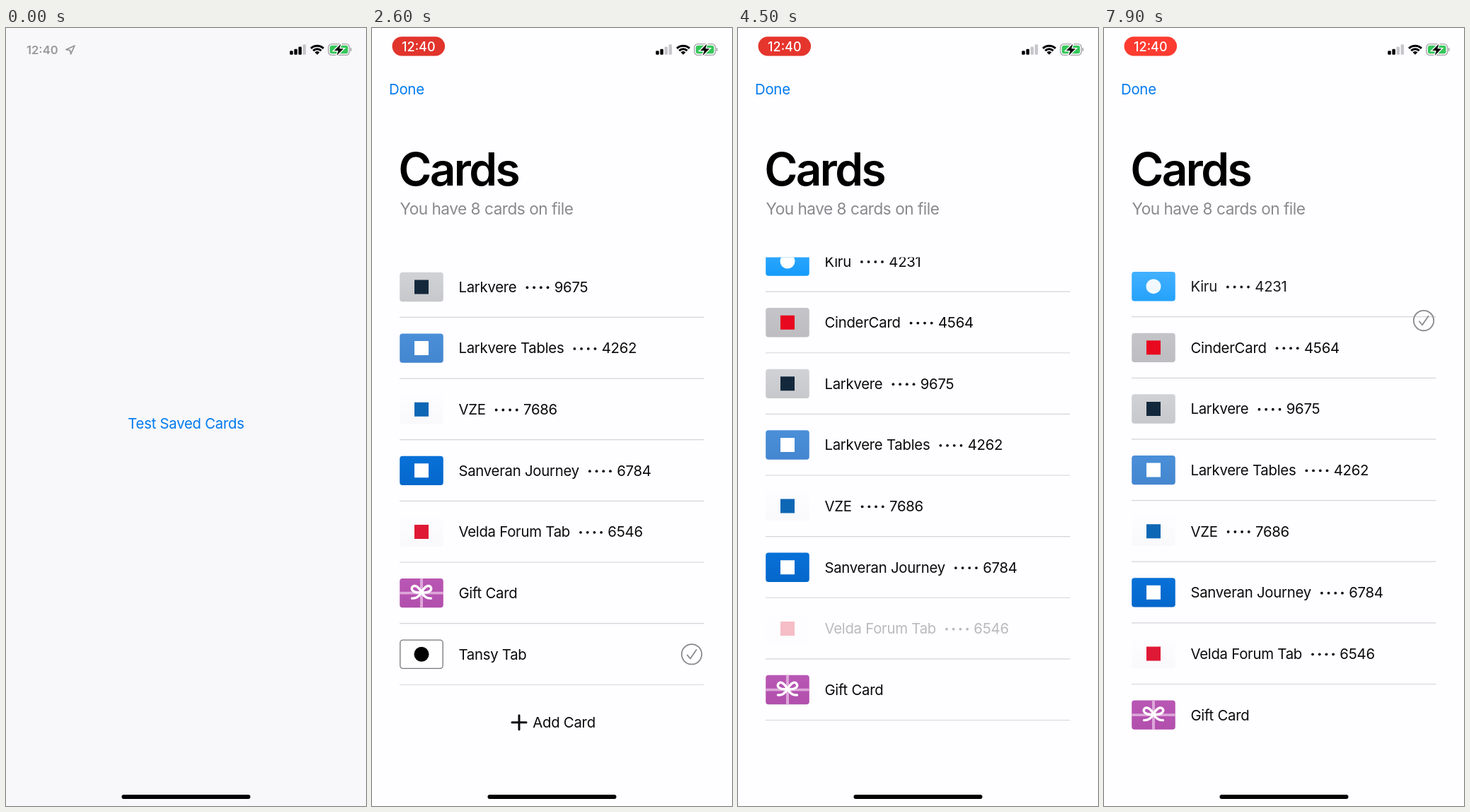
Animation, 509 px wide and 1101 px high, one loop 8000 ms. Source, as an HTML page with a canvas:

```html
<!DOCTYPE html>
<html lang="en">
<head>
<meta charset="utf-8">
<title>Saved cards</title>
<style>
  html, body { margin: 0; width: 100%; height: 100%; overflow: hidden; background: #f8f7fa; }
  canvas { display: block; width: 509px; height: 1101px; }
</style>
</head>
<body>
<canvas id="stage" width="509" height="1101"></canvas>
<script>
const ctx = document.getElementById('stage').getContext('2d');
const W = 509, H = 1101, LOOP = 8000, STEP = 100;
const BLUE = '#007aee', INK = '#0b0b0c', GRAY = '#8a898e';
const ROW_TOP = 365.7, ROW_GAP = 86.63, MAX_SCROLL = 172.5;
const LIST = { top: 324.5, bottom: 996.7 };
const ICON = { x: 39.2, w: 61.6, h: 41.4 };
const TEXT = 20.4;

const cards = [
  { name: 'Kiru', digits: '4231', fill: ['#35abff', '#159bfb'], mark: '#fff', round: true },
  { name: 'CinderCard', digits: '4564', fill: ['#c5c4c8', '#bdbcc0'], mark: '#e8081f' },
  { name: 'Larkvere', digits: '9675', fill: ['#d0d2d5', '#c6c8cc'], mark: '#14283c' },
  { name: 'Larkvere Tables', digits: '4262', fill: ['#4a8fd8', '#4486d0'], mark: '#fff' },
  { name: 'VZE', digits: '7686', fill: ['#fdfcfe', '#f9f8fb'], mark: '#0d67b5' },
  { name: 'Sanveran Journey', digits: '6784', fill: ['#0871d8', '#0467cb'], mark: '#fff' },
  { name: 'Velda Forum Tab', digits: '6546', fill: ['#fdfcfe', '#f9f8fb'], mark: '#df1935' },
  { name: 'Gift Card', fill: ['#b957b4', '#b24fad'], gift: true },
  { name: 'Tansy Tab', fill: ['#fff', '#fff'], mark: '#000', round: true, outline: true }
];

// Each track is a list of [time, value] keys.
const scrollKeys = [[1900, 0], [2450, MAX_SCROLL], [2908, MAX_SCROLL], [3508, 0],
  [4322, 0], [4931, MAX_SCROLL], [6330, MAX_SCROLL], [6650, 0]];
const checkKeys = [[6780, 8], [7040, 5], [7180, 5], [7450, 7], [7652, 7], [7952, 0]];
const homePress = [[550, 1], [650, 0.2], [750, 0.2], [980, 1]];
const rowPress = {
  0: [[7500, 1], [7580, 0.2], [7680, 0.2], [7920, 1]],
  5: [[6600, 1], [6700, 0.65], [6780, 0.2], [6850, 0.2], [7050, 1]],
  6: [[4320, 1], [4420, 0.2], [4480, 0.22], [4750, 1]],
  7: [[6980, 1], [7050, 0.2], [7100, 0.2], [7250, 1]]
};

const linear = p => p;
const smooth = p => p * p * (3 - 2 * p);

function track(keys, t, ease = linear) {
  if (t <= keys[0][0]) return keys[0][1];
  for (let i = 1; i < keys.length; i++) {
    const [t0, a] = keys[i - 1], [t1, b] = keys[i];
    if (t < t1) return a + (b - a) * ease((t - t0) / (t1 - t0));
  }
  return keys[keys.length - 1][1];
}

function faded(alpha, draw) {
  ctx.save();
  ctx.globalAlpha *= alpha;
  draw();
  ctx.restore();
}

function text(str, x, y, { size = TEXT, weight = 400, color = INK, track = -0.014, align = 'left' } = {}) {
  ctx.font = `${weight} ${size}px Inter, "Liberation Sans", sans-serif`;
  ctx.letterSpacing = `${track * size}px`;
  ctx.textAlign = align;
  ctx.fillStyle = color;
  ctx.fillText(str, x, y);
  return ctx.measureText(str).width;
}

function box(x, y, w, h, r, fill, stroke, width = 1) {
  ctx.beginPath();
  ctx.roundRect(x, y, w, h, r);
  if (fill) { ctx.fillStyle = fill; ctx.fill(); }
  if (stroke) { ctx.strokeStyle = stroke; ctx.lineWidth = width; ctx.stroke(); }
}

function disc(x, y, r, fill) {
  ctx.beginPath();
  ctx.arc(x, y, r, 0, Math.PI * 2);
  ctx.fillStyle = fill;
  ctx.fill();
}

function line(points, color, width, cap = 'butt') {
  ctx.beginPath();
  points.forEach(([x, y]) => ctx.lineTo(x, y));
  ctx.strokeStyle = color;
  ctx.lineWidth = width;
  ctx.lineCap = cap;
  ctx.lineJoin = 'round';
  ctx.stroke();
}

function ring(x, y, r, color, width) {
  ctx.beginPath();
  ctx.arc(x, y, r, 0, Math.PI * 2);
  ctx.strokeStyle = color;
  ctx.lineWidth = width;
  ctx.stroke();
}

function giftBow(y) {
  ctx.fillStyle = '#dca6d9';
  ctx.fillRect(68, y - ICON.h / 2, 4, ICON.h);
  ctx.fillRect(ICON.x, y - 1.8, ICON.w, 3.6);
  ctx.strokeStyle = '#fff';
  ctx.lineWidth = 3.4;
  ctx.lineCap = 'round';
  for (const side of [-1, 1]) {
    ctx.save();
    ctx.translate(70, y - 1);
    ctx.scale(side, 1);
    ctx.beginPath();
    ctx.moveTo(0, 0);
    ctx.bezierCurveTo(3, -6, 8, -11, 12, -8.5);
    ctx.bezierCurveTo(17, -4, 11, 1.5, 0, 0);
    ctx.bezierCurveTo(3, 5, 8, 9, 13.5, 8.5);
    ctx.stroke();
    ctx.restore();
  }
}

function cardIcon(card, y) {
  const { x, w, h } = ICON, top = y - h / 2;
  const fill = ctx.createLinearGradient(0, top, 0, top + h);
  card.fill.forEach((c, i) => fill.addColorStop(i, c));
  if (card.outline) box(x + 0.6, top + 0.6, w - 1.2, h - 1.2, 4, fill, '#77767a', 1.3);
  else box(x, top, w, h, 4, fill);
  if (card.gift) giftBow(y);
  else if (card.round) disc(70, y, 10.5, card.mark);
  else box(60, y - 10, 20, 20, 0, card.mark);
}

function cardRow(card, y) {
  cardIcon(card, y);
  const left = 122.4, end = left + text(card.name, left, y + 7.4);
  if (!card.digits) return;
  for (let i = 0; i < 4; i++) disc(end + 15 + i * 9.7, y + 0.8, 1.9, INK);
  text(card.digits, end + 53.3, y + 7.4);
}

function checkmark(y) {
  ring(452, y, 14.2, GRAY, 1.8);
  line([[445.8, y + 1.2], [450, y + 6.2], [458.6, y - 6.2]], GRAY, 1.8, 'round');
}

function cardList(t) {
  const scroll = track(scrollKeys, t, smooth);
  const rowY = i => ROW_TOP + i * ROW_GAP - scroll;
  ctx.save();
  ctx.beginPath();
  ctx.rect(0, LIST.top, W, LIST.bottom - LIST.top);
  ctx.clip();
  cards.forEach((card, i) => {
    const y = rowY(i);
    faded(rowPress[i] ? track(rowPress[i], t) : 1, () => cardRow(card, y));
    line([[39, y + 43], [469.5, y + 43]], '#d5d4d9', 1.2);
  });
  checkmark(rowY(track(checkKeys, t, smooth)));
  const addY = 1155.3 - scroll;
  line([[198, addY], [218, addY]], INK, 3, 'round');
  line([[208, addY - 10], [208, addY + 10]], INK, 3, 'round');
  text('Add Card', 227.2, addY + 7.4);
  ctx.restore();
}

function sheet(t) {
  const s = (t - 1200) / 1000;
  if (s < 0) return;
  const k = 15.9 * s;
  ctx.save();
  ctx.translate(0, H * (1 + k) * Math.exp(-k));
  ctx.fillStyle = '#fefdff';
  ctx.fillRect(0, 0, W, H);
  text('Done', 24, 93.5, { color: BLUE });
  text('Cards', 37.3, 223.3, { size: 64, weight: 600, track: -0.042, color: '#000' });
  text('You have 8 cards on file', 39.5, 263.8, { size: 22.7, color: GRAY, track: -0.023 });
  cardList(t);
  ctx.restore();
}

function home(t) {
  ctx.fillStyle = '#f8f7fa';
  ctx.fillRect(0, 0, W, H);
  faded(track(homePress, t), () => text('Test Saved Cards', 254.5, 567, { color: BLUE, align: 'center' }));
}

function clock() {
  text('12:40', 29, 37, { size: 16.6, weight: 600, track: 0 });
  ctx.beginPath();
  [[97, 25], [85, 30.6], [90.6, 31.6], [91.6, 36.8]].forEach(([x, y]) => ctx.lineTo(x, y));
  ctx.closePath();
  ctx.strokeStyle = INK;
  ctx.lineWidth = 1.8;
  ctx.lineJoin = 'round';
  ctx.stroke();
}

function recordPill(t) {
  const dim = (1 - Math.cos((t - 7800) / 1000 * Math.PI)) / 2;
  box(28.5, 12.2, 74.6, 27.2, 13.6, `rgb(${255 - 33 * dim}, ${59 - 8 * dim}, ${48 - 4 * dim})`);
  const time = track([[2300, 0], [2500, 1]], t);
  faded(1 - time, () => {
    ring(65.8, 26, 8.6, '#fff', 1.9);
    disc(65.8, 26, 4.5, '#fff');
  });
  faded(time, () => text('12:40', 65.8, 32.5, { size: 18, weight: 500, track: 0, color: '#fff', align: 'center' }));
}

function wifi() {
  const x = 440, y = 37.8, a = -Math.PI * 3 / 4, b = -Math.PI / 4;
  ctx.fillStyle = ctx.strokeStyle = '#000';
  ctx.lineCap = 'butt';
  ctx.lineWidth = 2.9;
  for (const r of [12.6, 8]) {
    ctx.beginPath();
    ctx.arc(x, y, r, a, b);
    ctx.stroke();
  }
  ctx.beginPath();
  ctx.moveTo(x, y);
  ctx.arc(x, y, 4.8, a, b);
  ctx.fill();
}

function battery() {
  box(455.8, 22.6, 29.8, 15.8, 4.8, null, '#a3a2a6', 1.3);
  box(457.9, 24.7, 25.6, 11.6, 3, '#34c759');
  box(486.8, 28, 1.6, 5, 0.8, '#a3a2a6');
  ctx.beginPath();
  [[473.5, 22.5], [464, 32], [469.8, 32], [467.6, 39], [477.2, 29.2], [471.4, 29.2]]
    .forEach(([x, y]) => ctx.lineTo(x, y));
  ctx.closePath();
  ctx.strokeStyle = '#fff';
  ctx.lineWidth = 2.6;
  ctx.lineJoin = 'miter';
  ctx.stroke();
  ctx.fillStyle = '#000';
  ctx.fill();
}

function statusBar(t) {
  faded(track([[0, 0.4], [200, 0]], t), clock);
  faded(track([[150, 0], [400, 1]], t), () => recordPill(t));
  const bars = t < 2300 ? 3 : 2;
  [5.5, 8, 11.2, 14.5].forEach((h, i) =>
    box(401.3 + i * 6.1, 37.8 - h, 4.5, h, 1.2, i < bars ? '#000' : '#c7c6ca'));
  wifi();
  battery();
}

function draw(now) {
  const t = Math.floor((now % LOOP) / STEP) * STEP;
  home(t);
  sheet(t);
  statusBar(t);
  box(163.5, 1085.1, 182, 6, 3, '#000');
}

let start;
function tick(now) {
  start ??= now;
  draw(now - start);
  requestAnimationFrame(tick);
}
draw(0);
requestAnimationFrame(tick);
</script>
</body>
</html>
```
